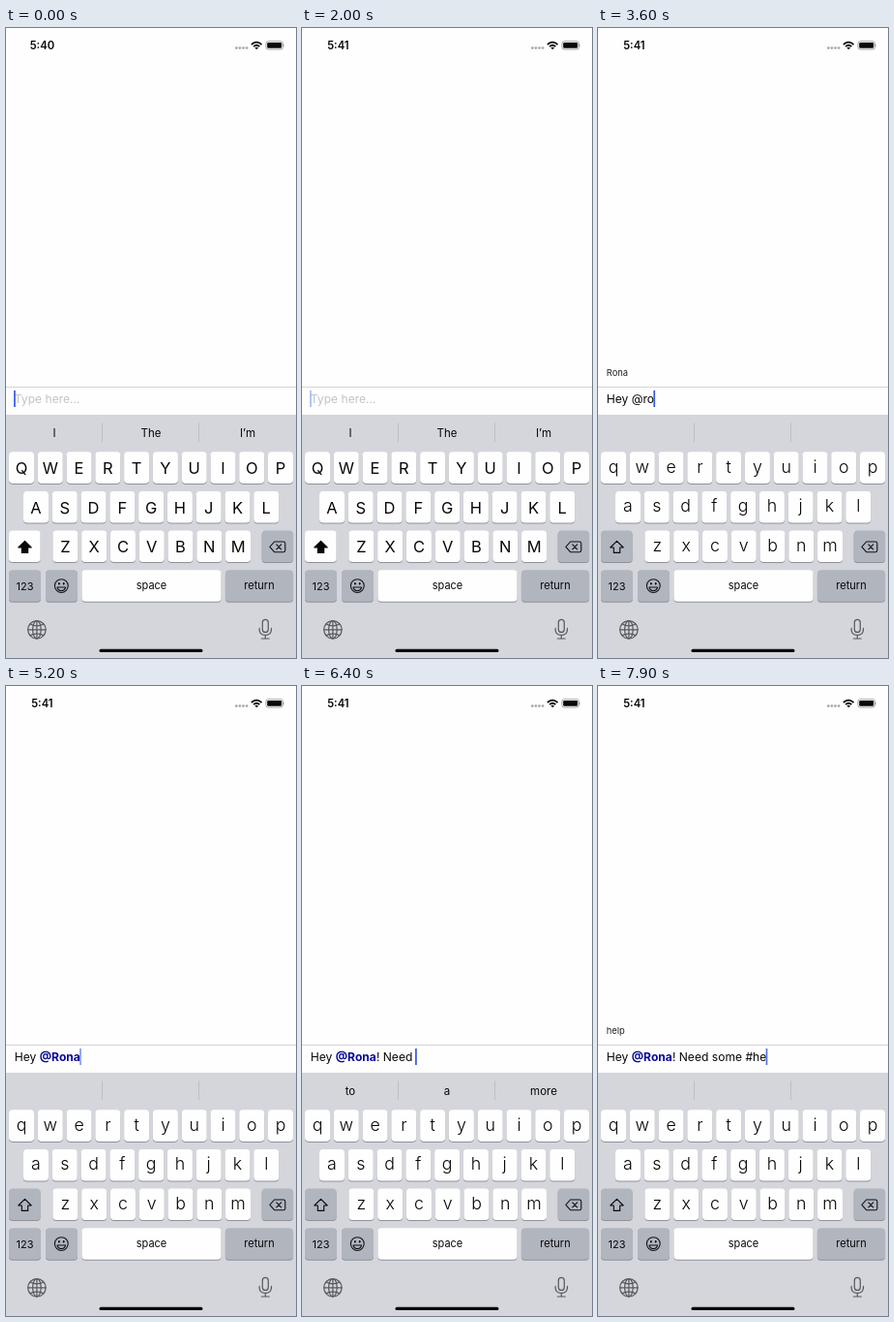
These frames come from a looping animation (300 by 650 pixels, 8000 ms). An HTML page:

```html
<!DOCTYPE html>
<html lang="en">
<head>
<meta charset="utf-8">
<title>Mention input</title>
<style>
  html, body { margin: 0; width: 100%; height: 100%; overflow: hidden; background: #fefefe; }
  svg { display: block; width: 300px; height: 650px; font-family: Inter, Roboto, sans-serif; fill: #080808; }
  text { white-space: pre; }
  .mid { text-anchor: middle; }
  .clock { font-size: 11.3px; font-weight: 600; }
  .body { font-size: 12.1px; }
  .hint { font-size: 12.1px; fill: #c4c4c8; }
  .tag { font-weight: 700; fill: #0a0a9c; }
  .row { font-size: 9.4px; fill: #222; }
  .word { font-size: 11.5px; }
  .label { font-size: 11px; }
  .upper { font-size: 16.5px; }
  .lower { font-size: 17.8px; font-weight: 300; }
  .line { fill: none; stroke: #111; stroke-width: 1.1; stroke-linecap: round; stroke-linejoin: round; }
  .tool { fill: none; stroke: #55585e; stroke-width: 1.2; stroke-linecap: round; }
</style>
</head>
<body>
<svg id="stage" viewBox="0 0 300 650">
  <rect width="300" height="650" fill="#fefefe"/>

  <text id="clock" class="mid clock" x="37.4" y="22"></text>
  <g fill="#a9a9ac">
    <circle cx="238.3" cy="20.6" r="1.4"/><circle cx="241.9" cy="20.6" r="1.4"/>
    <circle cx="245.5" cy="20.6" r="1.4"/><circle cx="249.1" cy="20.6" r="1.4"/>
  </g>
  <g fill="none" stroke="#080808" stroke-width="1.8">
    <path d="M253.9 17.1Q259.2 12.1 264.5 17.1"/>
    <path d="M256.1 19.2Q259.2 16.4 262.3 19.2"/>
  </g>
  <path d="M257.4 20.5Q259.2 19.2 261 20.5L259.2 22.3Z"/>
  <rect x="268.9" y="13.7" width="17.6" height="8.4" rx="2.4" fill="none" stroke="#8e8e90" stroke-width=".8"/>
  <rect x="270.2" y="15" width="15" height="5.8" rx="1.3"/>
  <path d="M287.2 16.4Q288.6 17.9 287.2 19.4Z" fill="#8e8e90"/>

  <g id="list"></g>
  <rect y="370" width="300" height="1" fill="#d5d5da"/>
  <text id="hint" class="hint" x="8.8" y="387">Type here...</text>
  <text id="body" class="body" x="8.8" y="387"></text>
  <rect id="caret" y="374" width="1.7" height="17" fill="#3558e6"/>

  <rect y="399" width="300" height="251" fill="#d4d6dc"/>
  <path d="M99.5 407.5V427M199.5 407.5V427" stroke="#bcbec5"/>
  <g id="words"></g>
  <g id="keys"></g>

  <path id="shift" d="M19.5 529.4L26.2 536H22.7V541.4H16.3V536H12.8Z" stroke="#080808" stroke-width="1.1" stroke-linejoin="round"/>
  <g class="line">
    <path d="M277.6 530H287Q288.8 530 288.8 531.8V538.9Q288.8 540.7 287 540.7H277.6L272.9 535.35Z"/>
    <path d="M279.8 532.9L284.7 537.8M284.7 532.9L279.8 537.8"/>
    <circle cx="57.3" cy="575.6" r="6.9"/>
    <path d="M53 577H61.6Q60.6 580.6 57.3 580.6T53 577Z"/>
  </g>
  <ellipse cx="54.9" cy="573.3" rx=".9" ry="1.3"/><ellipse cx="59.7" cy="573.3" rx=".9" ry="1.3"/>

  <g class="tool">
    <circle cx="31.9" cy="620.8" r="9.2"/>
    <ellipse cx="31.9" cy="620.8" rx="4.3" ry="9.2"/>
    <path d="M31.9 611.6V630M22.7 620.8H41.1M25.1 615Q31.9 618.6 38.7 615M25.1 626.6Q31.9 623 38.7 626.6"/>
    <rect x="265.3" y="610.4" width="6" height="13" rx="3"/>
    <path d="M262.1 619.4V620.4Q262.1 626.3 268.3 626.3T274.5 620.4V619.4M268.3 626.3V630M264.4 630H272.2"/>
  </g>
  <rect x="96.5" y="640.8" width="107" height="3.2" rx="1.6"/>
</svg>

<script>
const LOOP = 8000, PITCH = 29.78;
const $ = id => document.getElementById(id);

function add(parent, name, attrs, text) {
  const el = document.createElementNS("http://www.w3.org/2000/svg", name);
  for (const key in attrs) el.setAttribute(key, attrs[key]);
  if (text) el.textContent = text;
  parent.append(el);
  return el;
}

function drawKey(x, y, w, fill = "#fefefe") {
  add($("keys"), "rect", { x, y: y + 1, width: w, height: 32.6, rx: 3.8, fill: "#8f9299" });
  return add($("keys"), "rect", { x, y, width: w, height: 32.6, rx: 3.8, fill });
}

const GREY = "#b1b5be";
const letters = [];
[["QWERTYUIOP", 3, 437.3], ["ASDFGHJKL", 18, 477.9], ["ZXCVBNM", 48.4, 518.5]].forEach(([row, left, y]) => {
  [...row].forEach((char, i) => {
    const x = left + i * PITCH;
    drawKey(x, y, 26);
    letters.push({ el: add($("keys"), "text", { x: x + 13, class: "mid" }), char, y });
  });
});
const shiftKey = drawKey(3, 518.5, 32.6);
drawKey(264.7, 518.5, 32.4, GREY);
drawKey(3, 559.2, 33, GREY);
drawKey(41, 559.2, 33, GREY);
drawKey(78.4, 559.2, 144.2);
drawKey(226.9, 559.2, 70.2, GREY);
[["123", 19.6, 579.6], ["space", 150.5, 578.6], ["return", 262, 578.6]].forEach(([label, x, y]) =>
  add($("keys"), "text", { x, y, class: "mid label" }, label));

const words = [50, 150, 250].map(x => add($("words"), "text", { x, y: 422, class: "mid word" }));
const rows = [0, 1, 2, 3, 4].map(i => add($("list"), "text", { x: 8.8, y: 359.2 - i * 29.8, class: "row" }));
const [before, tag, after] = ["", "tag", ""].map(c => add($("body"), "tspan", { class: c }));

// Each step: time, typed text ("*" marks the mention), suggestions, list from the bottom up
const START = "I,The,I’m";
const steps = [
  [0, "", START, ""],
  [2300, "H", "“H”,Hi,How", ""],
  [2600, "He", "“He”,Hey,He’s", ""],
  [2800, "Hey @", START, "Rona,Greta,Nils,Edgar,Mabel"],
  [3400, "Hey @r", "", "Rona"],
  [3500, "Hey @ro", "", "Rona"],
  [3900, "Hey @ron", "", "Rona"],
  [4100, "Hey @rona", "", "Rona"],
  [4700, "Hey *", "", ""],
  [5600, "Hey *!", "", ""],
  [5700, "Hey *! ", START, ""],
  [5900, "Hey *! N", "“N”,No,Not", ""],
  [6000, "Hey *! Ne", "“Ne”,Need,New", ""],
  [6100, "Hey *! Nee", "“Ne”,Need,New", ""],
  [6300, "Hey *! Need", "“Ne”,Need,New", ""],
  [6400, "Hey *! Need ", "to,a,more", ""],
  [6700, "Hey *! Need s", "“s”,some,so", ""],
  [6800, "Hey *! Need so", "“so”,some,son", ""],
  [6900, "Hey *! Need som", "some,to,so", ""],
  [7100, "Hey *! Need some", "some,to,so", ""],
  [7200, "Hey *! Need some ", "of,time,more", ""],
  [7400, "Hey *! Need some #", START, "help,ideas,review"],
  [7800, "Hey *! Need some #h", "", "help"],
  [7900, "Hey *! Need some #he", "", "help"]
];

const blink = [
  [0, 1], [100, .7], [200, .3], [300, 0], [500, .5], [700, 1], [900, .8], [1100, .4], [1200, 0],
  [1300, .4], [1400, .8], [1500, 1], [1700, .7], [1800, .3], [1900, 0], [2000, .4], [2100, .8], [2200, 1],
  [3000, .7], [3100, .3], [3200, 0], [3400, 1], [5100, .85], [5200, .6], [5300, .3], [5400, 0],
  [5500, .5], [5600, 1], [7900, .85]
];

const at = (track, t) => track.findLast(step => step[0] <= t);

function render(t) {
  const [, typed, suggestions, names] = at(steps, t);
  const [head, tail] = typed.split("*");
  before.textContent = head;
  tag.textContent = tail === undefined ? "" : "@Rona";
  after.textContent = tail || "";
  $("hint").style.display = typed ? "none" : "";

  const end = typed ? $("body").getComputedTextLength() : 0;
  $("caret").setAttribute("x", 8.1 + end);
  $("caret").setAttribute("opacity", at(blink, t)[1]);

  const choices = suggestions.split(","), items = names.split(",");
  words.forEach((el, i) => el.textContent = choices[i] || "");
  rows.forEach((el, i) => el.textContent = items[i] || "");

  const caps = !typed;
  letters.forEach(({ el, char, y }) => {
    el.textContent = caps ? char : char.toLowerCase();
    el.setAttribute("class", "mid " + (caps ? "upper" : "lower"));
    el.setAttribute("y", y + (caps ? 22.6 : 21.3));
  });
  shiftKey.setAttribute("fill", caps ? "#fefefe" : GREY);
  $("shift").setAttribute("fill", caps ? "#080808" : "none");
  $("clock").textContent = t < 2000 ? "5:40" : "5:41";
}

let start, shown = -1;
function tick(now) {
  start ??= now;
  const t = Math.floor((now - start) % LOOP / 100) * 100;
  if (t !== shown) render(shown = t);
  requestAnimationFrame(tick);
}
render(0);
requestAnimationFrame(tick);
</script>
</body>
</html>
```
